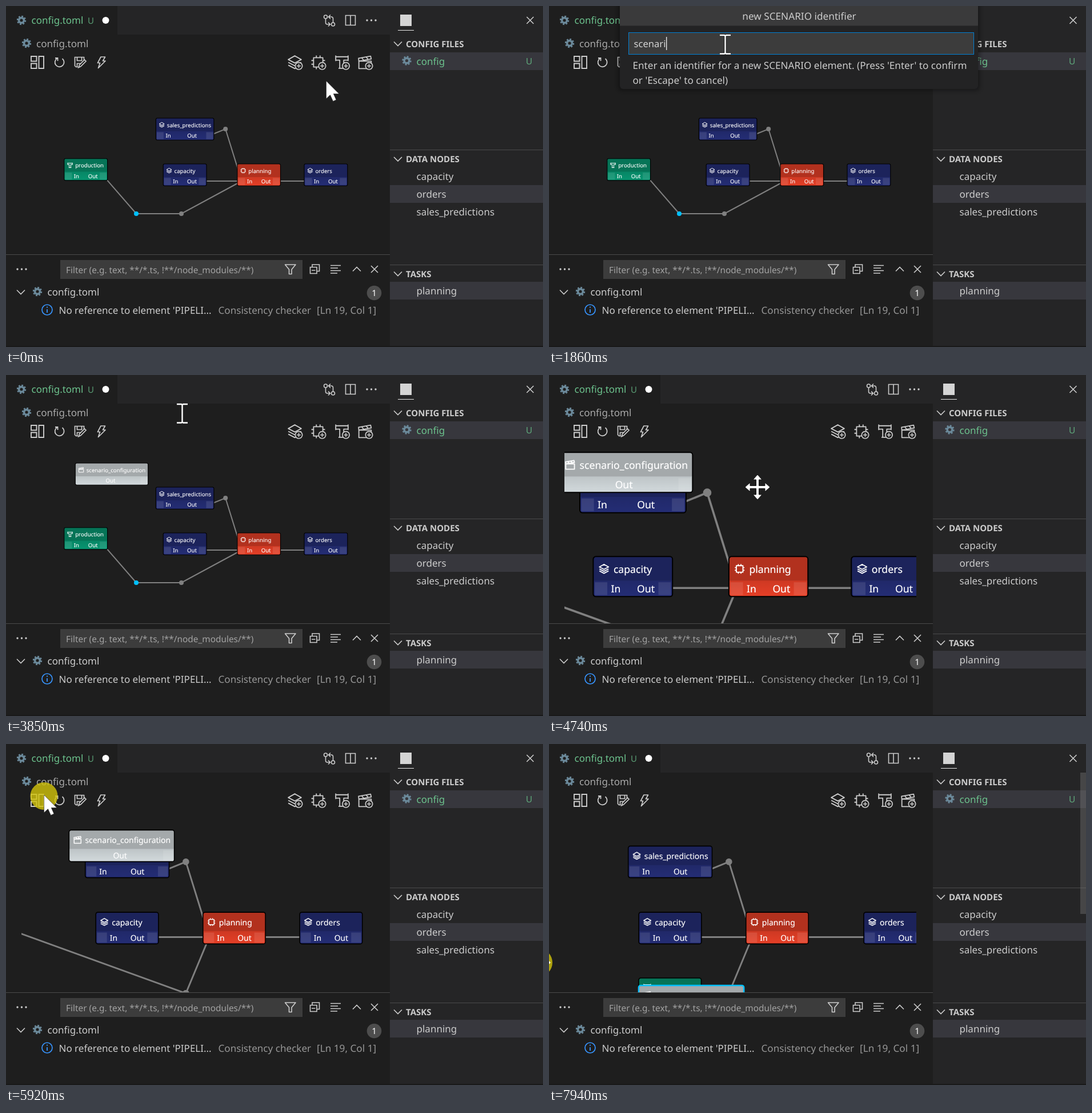
An HTML page for the animation above (8 s loop, 940 px wide and 596 px high).

```html
<!DOCTYPE html>
<html lang="en">
<head>
<meta charset="utf-8">
<title>Scenario editor</title>
<style>
  html, body { margin: 0; width: 100%; height: 100%; overflow: hidden; background: #1e1e1e; }
  svg { display: block; width: 940px; height: 596px; font-family: "Noto Sans", sans-serif; text-rendering: geometricPrecision; }
</style>
</head>
<body>
<svg id="stage" viewBox="0 0 940 596" xmlns="http://www.w3.org/2000/svg"></svg>
<script>
const LOOP = 8000;
const FG = '#cccccc', GREEN = '#6cc28d', GEAR = '#6b899a', BG = '#1e1e1e', SIDE = '#252526';

// ---------- drawing helpers ----------
const rect = (x, y, w, h, fill, more = '') =>
  `<rect x="${x}" y="${y}" width="${w}" height="${h}" fill="${fill}" ${more}/>`;
const text = (s, x, y, size = 17, fill = FG, more = '') =>
  `<text x="${x}" y="${y}" font-size="${size}" fill="${fill}" ${more}>${s}</text>`;
const line = (d, color = FG, width = 1.6, more = '') =>
  `<path d="${d}" fill="none" stroke="${color}" stroke-width="${width}" ${more}/>`;
const dot = (x, y, r, fill, more = '') =>
  `<circle cx="${x}" cy="${y}" r="${r}" fill="${fill}" ${more}/>`;

const ICONS = {
  layers: 'M12 1.500L1.500 7.500l10.500 5.500 10.500-5.500zM1.500 12l10.500 5.500L22.500 12M1.500 16.500l10.500 5.500 10.500-5.500',
  chip: 'M4.500 4.500h15v15h-15zM9 4.500V1M15 4.500V1M9 23v-3.500M15 23v-3.500M4.500 9H1M4.500 15H1M23 9h-3.500M23 15h-3.500',
  pipe: 'M2 1v9M22 1v9M2 3h20M2 8.500h6.500V21M22 8.500h-7V21M6.500 21.500h11',
  clap: 'M2 10h20v12H2zM2 10L1.500 5.500 21 2l1 4.500zM7 5l3 4M14 3.500l3 4'
};
const icon = (name, x, y, size, width, color = FG) =>
  line(ICONS[name], color, width * 24 / size, `transform="translate(${x} ${y}) scale(${size / 24})" stroke-linejoin="round"`);

const gear = (x, y) =>
  dot(x, y, 4.4, 'none', `stroke="${GEAR}" stroke-width="3.6"`) +
  dot(x, y, 7, 'none', `stroke="${GEAR}" stroke-width="2.4" stroke-dasharray="2.9 2.598"`);
const chevron = (x, y, up = 1) => line(`M${x - 7} ${y - 3.5 * up}l7 ${7 * up} 7 ${-7 * up}`);
const cross = (x, y) => line(`M${x - 6} ${y - 6}l12 12M${x + 6} ${y - 6}l-12 12`);
const dots = (x, y) => [-7.5, 0, 7.5].map(d => dot(x + d, y, 1.7, FG)).join('');

const addIcon = (name, x) =>
  icon(name, x, 85.5, 26, 1.8) + dot(x + 20, 104.8, 6.2, BG, `stroke="${FG}" stroke-width="1.7"`) +
  line(`M${x + 16.5} 104.800h7M${x + 20} 101.300v7`);

// ---------- fixed interface ----------
function editor() {
  return rect(0, 0, 940, 596, BG) + rect(195, 0, 477, 50, SIDE) +
    gear(27, 25) + text('config.toml', 44.5, 31, 17, GREEN) + text('U', 143, 30.5, 15, '#5a9d74') + dot(174.5, 25, 6, '#fff') +
    gear(36, 65) + text('config.toml', 53, 72, 17.1, '#a9a9a9') +
    dot(559.5, 19, 3, 'none', `stroke="${FG}" stroke-width="1.600"`) +
    dot(572.500, 32, 3, 'none', `stroke="${FG}" stroke-width="1.600"`) +
    line('M559.500 22v7q0 3 3 3h5M564 28.500l3.500 3.500-3.500 3.500M572.500 29v-7q0-3-3-3h-5M568 15.500L564.500 19l3.500 3.500') +
    line('M594.500 16.500h17v17h-17zM603 16v18') + dots(639.5, 25) +
    line('M44 88h9.500v8.500H44zM44 100.500h9.500v8.500H44zM57.500 88H66v21h-8.500z', FG, 1.9) +
    line('M89.500 91.500A8 8 0 1 0 98.500 92M86 91h4.500v5', FG, 1.8) +
    line('M126 106.500h-3.500l-2-2V89.500h16v5M124.500 90v5.500h8V90M124.500 106v-5.500h6M127 107.500l1.500-4.500 9-9 2.500 2.500-9 9z', FG, 1.7) +
    line('M166 89h7.500l-4 7h4.500l-12.500 12.500 3-9h-4z', FG, 1.7, 'stroke-linejoin="round"') +
    addIcon('layers', 492.5) + addIcon('chip', 533.5) + addIcon('pipe', 575) + addIcon('clap', 615.5);
}

function panel() {
  return rect(0, 434, 672, 162, BG) + rect(0, 434, 672, 1, '#4b4b4b') +
    dots(27.5, 460) + rect(95, 444, 424, 33, '#3c3c3c') +
    text('Filter (e.g. text, **/*.ts, !**/node_modules/**)', 105, 467, 15.4, '#a3a3a3') +
    line('M488.500 452h18.500l-7 8.500v8h-4.500v-8z', FG, 1.6, 'stroke-linejoin="round"') +
    line('M536 456v-4h12.500v11.500h-4M532.500 456.500h11.500v11H532.500zM535 462h6.500') +
    line('M568 453.500h18M568 458h13M568 462.500h18M568 467h12') +
    chevron(614, 460, -1) + cross(645, 460) +
    chevron(26, 500) + gear(55, 499) + text('config.toml', 72.5, 506) +
    dot(644.5, 501.5, 12.8, '#4d4d4d') + text('1', 644.5, 507, 15, '#fff', 'text-anchor="middle"') +
    dot(72, 531, 9, 'none', 'stroke="#3794ff" stroke-width="1.700"') +
    line('M72 530v6M72 525.500v2', '#3794ff', 1.8) +
    text("No reference to element 'PIPELI...", 92.5, 538) +
    text('Consistency checker', 371.5, 538, 17.1, '#979797') +
    text('[Ln 19, Col 1]', 544, 538, 17.2, '#979797');
}

function sidebar() {
  const head = (s, y) => chevron(686, y - 5.5) + text(s, 700, y, 15, FG, 'font-weight="700"');
  const row = y => rect(672, y, 268, 31, '#37373d');
  const rule = y => rect(672, y, 268, 1, '#4b4b4b');
  return rect(672, 0, 268, 596, SIDE) + rect(690, 15, 20, 20, '#d4d4d4') + rect(686, 42, 28, 1, '#e7e7e7') +
    cross(917.5, 25) + head('CONFIG FILES', 71.5) + row(81) + gear(701.5, 95.5) +
    text('config', 718.5, 103, 17, GREEN) + text('U', 910, 102, 15.5, '#5fa87b') +
    rule(251) + head('DATA NODES', 273) + row(313) +
    text('capacity', 718.5, 304) + text('orders', 718.5, 335) + text('sales_predictions', 718.5, 366) +
    rule(452) + head('TASKS', 473.5) + row(482) + text('planning', 718.5, 504) +
    rect(0, 594, 940, 2, '#191919');
}

// ---------- diagram ----------
const KINDS = {
  data: { color: '#283282', icon: 'layers' },
  task: { color: '#ff462b', icon: 'chip' },
  pipe: { color: '#08a67d', icon: 'pipe' },
  scen: { color: '#eaf2f5', icon: 'clap' }
};

function node(kind, name, x, y, w, selected) {
  const { color, icon: sign } = KINDS[kind];
  const label = (s, lx, ly, size) => text(s, lx, ly, size, '#fff', 'stroke="#fff" stroke-width=".12"');
  const plug = px => rect(px, 24.5, 12, 12.2, '#fff', 'fill-opacity=".1"');
  const inPort = kind === 'scen' ? '' : plug(1.5) + label('In', 17, 34.2, 9.6);
  const outX = kind === 'scen' ? 53.3 : w / 2 + 4;
  return `<g transform="translate(${x} ${y})">` +
    rect(0, 0, w, 38.2, color, 'rx="2.500"') +
    `<path d="M0 23V2.500Q0 0 2.500 0H${w - 2.5}Q${w} 0 ${w} 2.500V23z" fill-opacity=".3"/>` +
    rect(0, 23, w, 15.2, 'url(#shade)', 'rx="1"') +
    inPort + plug(w - 13.5) + label('Out', outX, 34.2, 9.6) +
    icon(sign, 5.3, 6.8, 10, 1, '#fff') + label(name, 19.4, 15.8, 9.65) +
    rect(0, 0, w, 38.2, 'none', `rx="2.500" stroke="${selected ? '#00c0ff' : '#000'}" stroke-width="${selected ? 1.7 : 1.1}"`) +
    '</g>';
}

// Numbers interpolated between [time, ...values] rows
function track(keys, t) {
  let i = 0;
  while (i < keys.length - 1 && keys[i + 1][0] <= t) i++;
  const a = keys[i], b = keys[i + 1] || a;
  const k = b === a ? 0 : Math.max(0, (t - a[0]) / (b[0] - a[0]));
  return a.slice(1).map((v, j) => typeof v === 'number' ? v + (b[j + 1] - v) * k : v);
}

const VIEW = [
  [4530, 1, 0, 0], [4670, 1.831, -426.5, -188], [4740, 1.831, -426.5, -188],
  [5090, 1.685, -356, -157], [5300, 1.446, -240.7, -105]
];
const SCENARIO = [[4390, 121.3, 154], [4530, 242.8, 176.6], [6930, 242.8, 176.6], [7420, 275, 364.4]];
const BEND = [[4390, 228, 363, 307, 363], [4530, 384.2, 374, 384.2, 374]];

function graph(t) {
  const [s, tx, ty] = track(VIEW, t);
  const [sx, sy] = track(SCENARIO, t);
  const [ax, ay, bx, by] = track(BEND, t);
  const tidy = t >= 6720;
  const [px, py] = tidy ? [275, 355.5] : [101.8, 266.7];
  const ox = tidy ? 547.5 : 522;
  const link = d => line(d, '#808080', 2);
  return `<g transform="translate(${tx} ${ty}) scale(${s})">` +
    link('M357 226L384.200 215 412.500 306') + link('M344 306H412') + link(`M474 306H${ox + 7.5}`) +
    link(`M${px + 68.5} ${py + 30}L${ax} ${ay} ${bx} ${by} 412.500 306`) +
    dot(384.2, 215, 4, '#808080') + dot(ax, ay, 4, t < 4460 ? '#00c0ff' : '#808080') + dot(bx, by, 4, '#808080') +
    node('data', 'sales_predictions', 262.4, 196, 101.5) +
    node('data', 'capacity', 275.2, 276, 75.8) +
    node('task', 'planning', 404.9, 276, 75.6) +
    node('data', 'orders', ox, 276, 75.8) +
    node('pipe', 'production', px, py, 75.8) +
    (t >= 3850 ? node('scen', 'scenario_configuration', sx, sy, 127.4, t >= 6930) : '') + '</g>';
}

// ---------- pointer ----------
const POINTERS = {
  arrow: '<path d="M0 0V31L7 24.500 12 35.500 17.500 33 12.800 22.500H22.500z" fill="#fff" stroke="#222" stroke-width=".6"/>',
  beam: ['#222', '#fff'].map((c, i) => line('M-9.500-16h8l1.500 1.500 1.500-1.500h8M0-15v30M-9.500 16.500h8L0 15l1.500 1.500h8', c, 4.4 - 2 * i)).join(''),
  move: '<path d="M0-22L8-13H2.500V-2.500H13V-8L22 0 13 8V2.500H2.500V13H8L0 22-8 13H-2.500V2.500H-13V8L-22 0-13-8V-2.500H-2.500V-13H-8z" fill="#fff" stroke="#111" stroke-width="1"/>',
  sides: '<path d="M-21 0L-12-8V-2.500H12V-8L21 0 12 8V2.500H-12V8z" fill="#fff"/>'
};
const POINTER = [
  [0, 560.5, 131, 'arrow', 'off'], [210, 641, 104, 'arrow', 'on'], [940, 641, 104, 'arrow', 'off'],
  [1220, 480, 160, 'arrow', 'off'], [1430, 308.5, 67, 'beam', 'off'], [4180, 308.5, 67, 'move', 'off'],
  [4390, 185, 166, 'move', 'off'], [4530, 306, 188, 'move', 'off'], [4740, 365, 196, 'move', 'off'],
  [4950, 467, 207, 'move', 'off'], [5300, 467, 207, 'move', 'off'], [5640, 120, 112, 'arrow', 'off'],
  [5850, 66.5, 89, 'arrow', 'off'], [5920, 66.5, 89, 'arrow', 'on'], [6650, 66.5, 89, 'move', 'off'],
  [6930, 200, 152, 'move', 'on'], [7420, 247, 424, 'move', 'on'], [7760, 247, 424, 'move', 'on'],
  [7940, -18, 382, 'sides', 'on']
];
function pointer(t) {
  const [x, y, shape, press] = track(POINTER, t);
  const glow = press === 'on' ? dot(0, shape === 'arrow' ? 2 : 0, 24, '#d2c30a', 'fill-opacity=".8"') : '';
  return `<g transform="translate(${x} ${y})">${glow}${POINTERS[shape]}</g>`;
}

// ---------- assembly ----------
const stage = document.getElementById('stage');
stage.innerHTML = `<defs>
  <linearGradient id="shade" x2="0" y2="1"><stop stop-opacity=".19"/><stop offset="1" stop-opacity=".1"/></linearGradient>
  <clipPath id="view"><path d="M27 115H643V434H27z"/></clipPath>
  <filter id="blur" x="-10%" y="-30%" width="120%" height="160%"><feGaussianBlur stdDeviation="5"/></filter></defs>` +
  editor() + '<g clip-path="url(#view)"><g id="graph"></g></g>' + panel() + sidebar() +
  rect(930, 50, 10, 247, '#797979', 'id="bar"') +
  '<g id="dialog">' +
  rect(122, -6, 631, 153, '#000', 'fill-opacity=".45" filter="url(#blur)"') +
  rect(124, -8, 627, 153, '#232324', 'rx="6"') + rect(124, 0, 627, 34.5, '#3a3a3b') +
  text('new SCENARIO identifier', 438, 24, 17.2, FG, 'text-anchor="middle"') +
  rect(139.5, 46.5, 604, 38, '#3c3c3c', 'stroke="#007fd4" stroke-width="1"') +
  text('', 148.5, 72, 16.6, '#d4d4d4', 'id="typed"') + rect(149, 54, 1.4, 23, '#e8e8e8', 'id="caret"') +
  text("Enter an identifier for a new SCENARIO element. (Press 'Enter' to confirm", 146.5, 110, 17.15) +
  text("or 'Escape' to cancel)", 146.5, 135.5, 17.15) + '</g><g id="pointer"></g>';

const part = id => document.getElementById(id);
const [graphEl, dialog, typed, caret, pointerEl, bar] = ['graph', 'dialog', 'typed', 'caret', 'pointer', 'bar'].map(part);

// Bursts of motion [start, end, steps]; the picture rests between them
const BURSTS = [
  [0, 0, 1], [70, 210, 3], [610, 610, 1], [1010, 1790, 12], [1860, 2630, 12], [2700, 3050, 6], [3850, 3850, 1],
  [4250, 5020, 12], [5090, 5850, 12], [5920, 5920, 1], [6720, 7420, 11], [7820, 7940, 3]
];
function snap(t) {
  const [from, to, n] = BURSTS.filter(b => b[0] <= t).pop();
  if (n === 1) return from;
  const step = (to - from) / (n - 1);
  return from + Math.min(n - 1, Math.floor((t - from) / step + 1e-6)) * step;
}

const WORD = 'scenario_configuration';
function draw(t) {
  graphEl.innerHTML = graph(t);
  pointerEl.innerHTML = pointer(t);
  const open = t >= 610 && t < 3850;
  dialog.style.display = open ? '' : 'none';
  if (open) {
    const n = Math.round(7 + (t - 1860) / 70);
    typed.textContent = WORD.slice(0, Math.max(0, n));
    caret.setAttribute('x', 149 + (n > 0 ? typed.getComputedTextLength() : 0));
  }
  bar.setAttribute('fill-opacity', .4 * Math.min(1, Math.max(0, (t - 7780) / 120)));
}

let start, shown = -1;
function tick(now) {
  if (start === undefined) start = now;
  const t = snap((now - start) % LOOP);
  if (t !== shown) draw(shown = t);
  requestAnimationFrame(tick);
}
draw(0);
requestAnimationFrame(tick);
</script>
</body>
</html>
```
